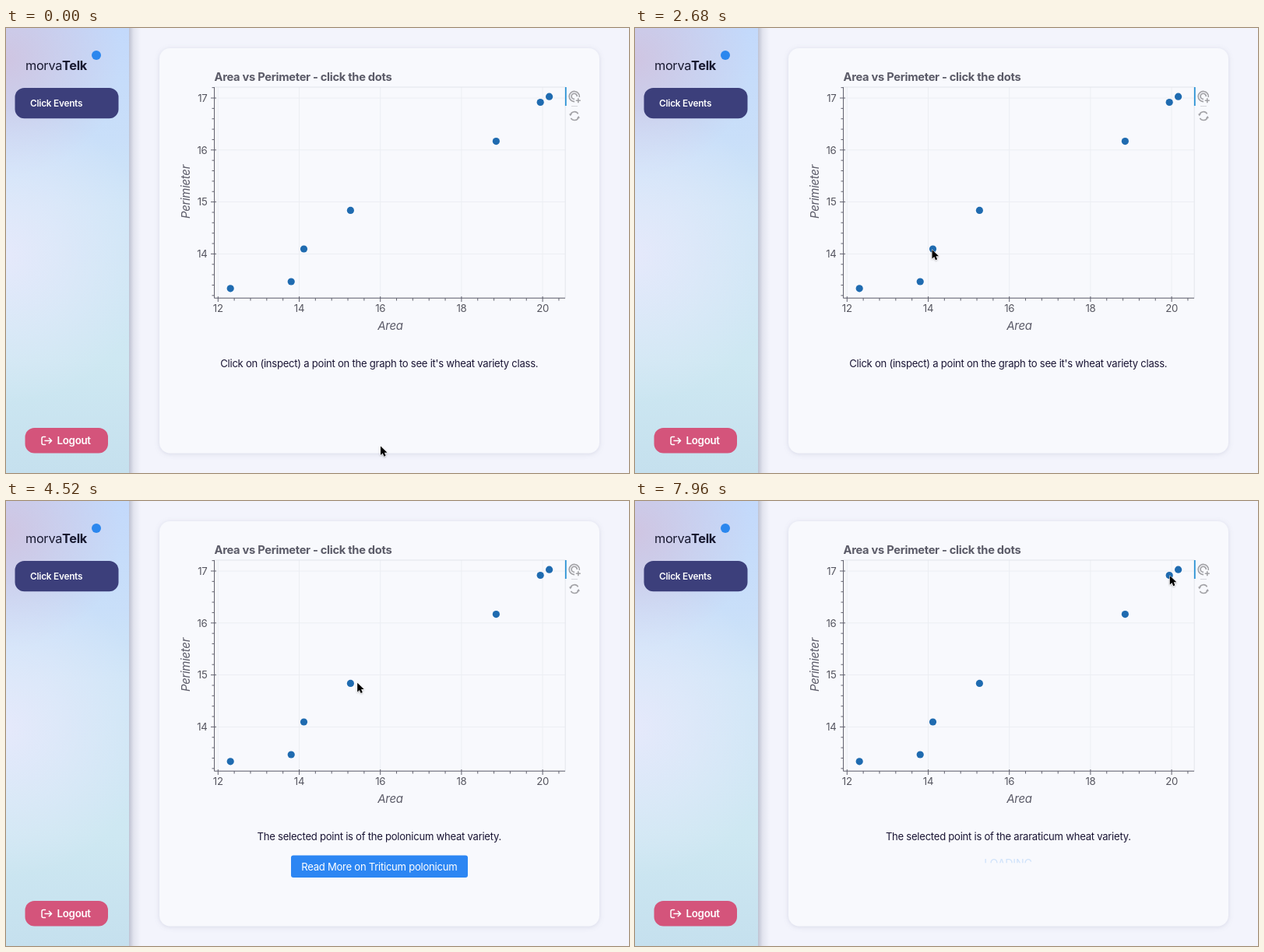
Animation, 800 px wide and 572 px high, one loop 8 s. Source, as an HTML page:

```html
<!DOCTYPE html>
<html lang="en">
<head>
<meta charset="utf-8">
<title>Click events</title>
<style>
  html, body { margin: 0; width: 100%; height: 100%; overflow: hidden; background: #f3f4fc; }
  svg { display: block; width: 800px; height: 572px; }
  text { font: 13.1px Inter, "Open Sans", sans-serif; letter-spacing: -.02em; fill: #1a1534; }
  .mid { text-anchor: middle; }
  .end { text-anchor: end; }
  .brand { font-size: 16.3px; fill: #17182f; }
  .brand tspan { font-weight: 700; }
  .nav { font-size: 11.8px; font-weight: 600; fill: #fff; }
  .logout { font-size: 13.3px; font-weight: 600; fill: #fff; }
  .title { font-size: 14.7px; font-weight: 700; fill: #5b5b68; }
  .tick { font-size: 13.2px; fill: #55555f; }
  .label { font-size: 15px; font-style: italic; fill: #5b5b68; }
  .button { fill: #fff; }
  .loading { font-size: 14.3px; fill: #cfe2fa; }
  .axis { stroke: #62626e; fill: none; }
  .grid { stroke: #eceef3; fill: none; }
  .icon { stroke: #a2a2a6; stroke-width: 1.6; fill: none; }
</style>
</head>
<body>
<svg viewBox="0 0 800 572">
  <defs>
    <linearGradient id="sky" x2="0" y2="1">
      <stop offset="0" stop-color="#c3d9fb"/>
      <stop offset=".25" stop-color="#c9dff9"/>
      <stop offset=".4" stop-color="#cfe6f7"/>
      <stop offset=".75" stop-color="#cee8f2"/>
      <stop offset="1" stop-color="#c5e0ee"/>
    </linearGradient>
    <radialGradient id="lilac" gradientUnits="userSpaceOnUse" cx="0" cy="40" r="150">
      <stop offset="0" stop-color="#cfc5e2"/>
      <stop offset="1" stop-color="#cfc5e2" stop-opacity="0"/>
    </radialGradient>
    <radialGradient id="haze" gradientUnits="userSpaceOnUse" cx="0" cy="292" r="190">
      <stop offset="0" stop-color="#e5e9fb"/>
      <stop offset="1" stop-color="#e5e9fb" stop-opacity="0"/>
    </radialGradient>
    <linearGradient id="edge">
      <stop offset="0" stop-color="#8a90a8" stop-opacity=".5"/>
      <stop offset=".4" stop-color="#8a90a8" stop-opacity=".16"/>
      <stop offset="1" stop-color="#8a90a8" stop-opacity="0"/>
    </linearGradient>
    <filter id="soft" x="-10%" y="-10%" width="120%" height="120%">
      <feDropShadow dx="0" dy="1" stdDeviation="3" flood-color="#7c80a0" flood-opacity=".24"/>
    </filter>
    <filter id="under" x="-60%" y="-40%" width="220%" height="200%">
      <feDropShadow dx="0" dy="1" stdDeviation="1" flood-opacity=".3"/>
    </filter>
    <clipPath id="reveal"><rect id="revealBox" x="430" y="455" width="100" height="0"/></clipPath>
  </defs>

  <rect width="800" height="572" fill="#f3f4fc"/>
  <rect x="158" width="15" height="572" fill="url(#edge)"/>
  <rect width="158" height="572" fill="url(#sky)"/>
  <rect width="158" height="572" fill="url(#lilac)"/>
  <rect width="158" height="572" fill="url(#haze)"/>

  <text class="brand" x="25" y="54">morva<tspan>Telk</tspan></text>
  <circle cx="116" cy="35" r="6" fill="#2b87ee"/>
  <rect x="11.5" y="77" width="133" height="39.3" rx="12" fill="#3c3f7b"/>
  <text class="nav" x="31" y="101">Click Events</text>
  <rect x="24.5" y="514" width="106.5" height="32.5" rx="12" fill="#d4547b"/>
  <path d="M50.5 525.5H48Q46 525.5 46 527.5V533.5Q46 535.5 48 535.5H50.5M50 530.5H58.5M55.3 527.2L58.6 530.5L55.3 533.8"
    fill="none" stroke="#fff" stroke-width="1.5" stroke-linecap="round" stroke-linejoin="round"/>
  <text class="logout" x="65.5" y="535.3">Logout</text>

  <rect x="197" y="26" width="565" height="520.5" rx="14" fill="#f8f9fd" filter="url(#soft)"/>
  <text class="title" x="267.5" y="67.5">Area vs Perimeter - click the dots</text>
  <g id="plot"></g>
  <text class="label mid" x="493.5" y="388">Area</text>
  <text class="label mid" transform="translate(235.5 210.5) rotate(-90)">Perimieter</text>

  <path d="M718.8 76V100" stroke="#2a93d5" stroke-width="1.8"/>
  <g class="icon">
    <path d="M736.3 89A6.6 6.6 0 1 0 730 94.6M733.3 88A3.6 3.6 0 1 0 730 91.4"/>
    <path d="M734.8 90.3V96.3M731.8 93.3H737.8"/>
    <path d="M726 100.5H734" stroke="#d5d6dc" stroke-width="1"/>
    <path d="M724.8 111.5A5.4 5.4 0 0 1 734.6 110.3M735.2 114.7A5.4 5.4 0 0 1 725.4 115.9"/>
    <path d="M723 110.5H727L724.7 113.2ZM733 115.7H737L735.3 113Z" fill="#a2a2a6" stroke="none"/>
  </g>

  <text class="mid" id="message" x="479.3" y="436"></text>
  <g id="link">
    <rect x="366" y="455.5" width="227" height="28.5" rx="3" fill="#2c86f3"/>
    <text class="button mid" x="479.3" y="474.6">Read More on Triticum polonicum</text>
  </g>
  <g clip-path="url(#reveal)"><text class="loading mid" x="479" y="470.5">LOADING</text></g>

  <path id="cursor" d="M0 0V11.6L2.7 9.1L4.5 13.2L6.6 12.3L4.9 8.3H8.5Z"
    stroke="#fff" stroke-width="1" stroke-linejoin="round" paint-order="stroke" filter="url(#under)"/>
</svg>
<script>
const LOOP = 8000;
const byId = id => document.getElementById(id);
const px = v => 272.3 + (v - 12) * 52.1;
const py = v => 90 + (17 - v) * 66.8;

function add(tag, attrs, content = '') {
  const node = document.createElementNS('http://www.w3.org/2000/svg', tag);
  for (const key in attrs) node.setAttribute(key, attrs[key]);
  node.textContent = content;
  byId('plot').append(node);
}
const line = (kind, d) => add('path', { class: kind, d });

function drawPlot() {
  for (let v = 12; v <= 20; v += 2) line('grid', `M${px(v)} 76V347`);
  for (let v = 14; v <= 17; v++) line('grid', `M268 ${py(v)}H718`);
  add('rect', { x: 267.5, y: 76, width: 450.7, height: 271, fill: 'none', stroke: '#e3e5eb' });
  line('axis', 'M267.5 76V347.2H718');
  for (let i = 0; i <= 21; i++) {
    const v = 12 + i * .4, major = i % 5 === 0;
    line('axis', major ? `M${px(v)} 345V352` : `M${px(v)} 347V350.5`);
    if (major) add('text', { class: 'tick mid', x: px(v), y: 365.3 }, v);
  }
  for (let i = 0; i <= 20; i++) {
    const v = 13.2 + i * .2, major = i % 5 === 4;
    line('axis', major ? `M263 ${py(v)}H270` : `M264.5 ${py(v)}H268`);
    if (major) add('text', { class: 'tick end', x: 258.5, y: py(v) + 4.8 }, Math.round(v));
  }
  const seeds = [[288.2, 334.8], [366.2, 326], [382.5, 284], [442.4, 234.4],
                 [629.4, 145.6], [686.2, 95.5], [697.6, 88.2]];
  for (const [cx, cy] of seeds) add('circle', { cx, cy, r: 4.6, fill: '#1f6bb0' });
}

// Pointer stops: time, x, y
const stops = [
  [0, 481, 537.5], [240, 481, 537.5], [1300, 381.5, 285], [4160, 381.5, 285],
  [4520, 451.2, 233.8], [4800, 441.5, 233.8], [6100, 441.5, 233.8],
  [6760, 705.7, 98.5], [7100, 705.7, 98.5], [7480, 686.8, 96], [LOOP, 686.8, 96]
];
const variety = name => `The selected point is of the ${name} wheat variety.`;
const messages = [
  [0, "Click on (inspect) a point on the graph to see it's wheat variety class."],
  [3760, variety('polonicum')],
  [7880, variety('araraticum')]
];
const loads = [[3760, 4080], [7880, LOOP]];

function pointerAt(t) {
  const i = stops.findIndex(s => s[0] > t);
  const [t0, x0, y0] = stops[i - 1], [t1, x1, y1] = stops[i];
  const p = (t - t0) / (t1 - t0), e = p * p * (3 - 2 * p);
  return [x0 + (x1 - x0) * e, y0 + (y1 - y0) * e];
}

function render(now) {
  const t = now % LOOP;
  byId('cursor').setAttribute('transform', `translate(${pointerAt(t)})`);
  const text = messages.filter(m => m[0] <= t).pop()[1];
  if (byId('message').textContent !== text) byId('message').textContent = text;
  const load = loads.find(([a, b]) => t >= a && t < b);
  byId('revealBox').setAttribute('height', load ? Math.min(22, (t - load[0]) * .125) : 0);
  byId('link').style.display = t >= 4080 && t < 7880 ? '' : 'none';
}

function tick() {
  render(performance.now());
  requestAnimationFrame(tick);
}
drawPlot();
tick();
</script>
</body>
</html>
```
